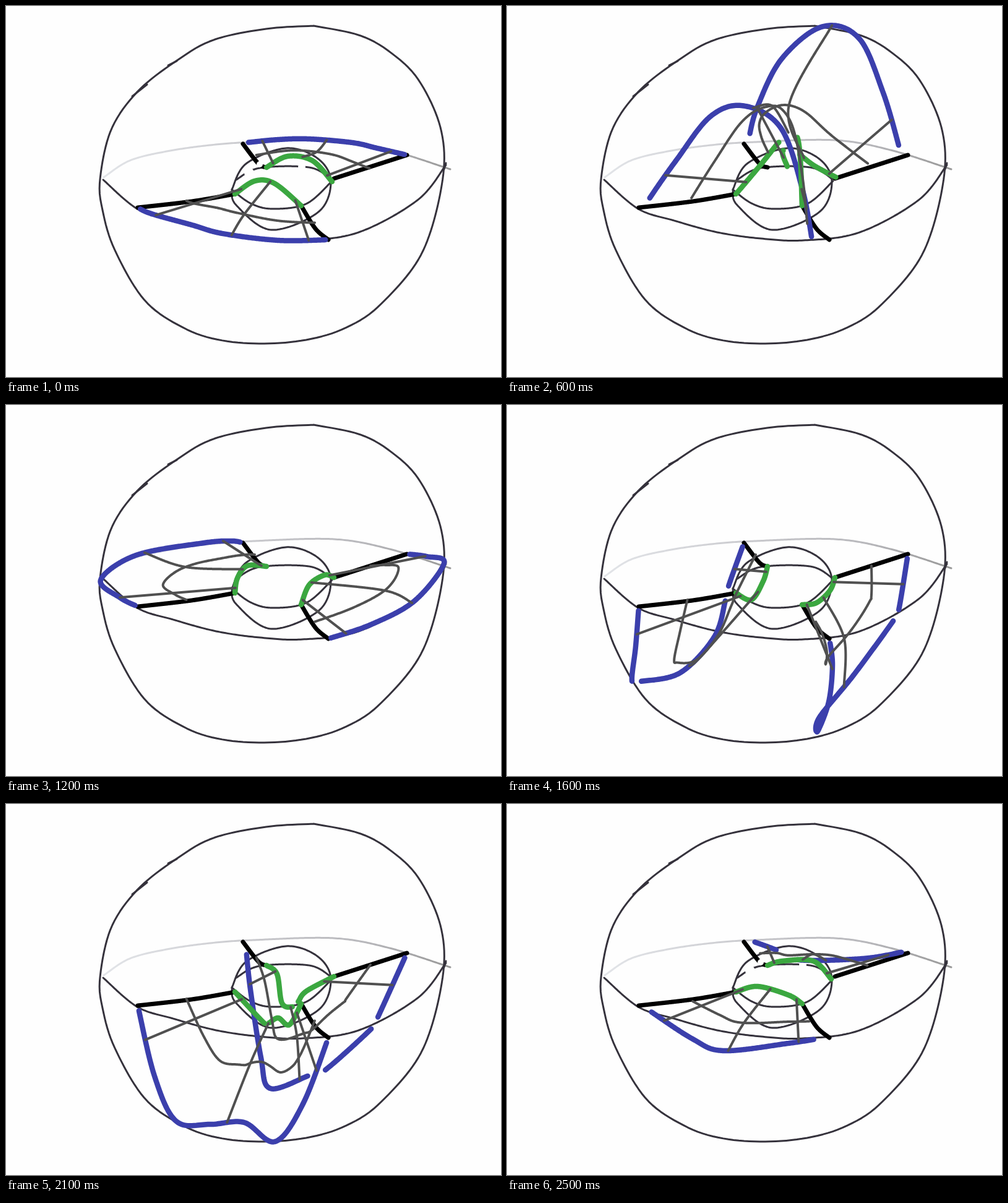
An HTML page with a canvas that plays this animation: 800 px wide and 600 px high, repeating every 2.6 s.

```html
<!DOCTYPE html>
<html lang="en">
<head>
<meta charset="utf-8">
<title>Turning sheets</title>
<style>
html, body { margin: 0; width: 100%; height: 100%; overflow: hidden; background: #fefefe; }
canvas { display: block; }
</style>
</head>
<body>
<canvas id="stage" width="800" height="600"></canvas>
<script>
const ctx = document.getElementById("stage").getContext("2d");
const LOOP = 2600, STEP = 100, N = 200, PAPER = "#fefefe";
const INK = "#35323c", BLUE = "#3b3fac", GREEN = "#3ba740", GREY = "#505050";

// Four fixed spokes join the outer ball (capital) to the inner one (small letter).
const ends = {
  A: [213, 326], a: [370, 304], B: [383, 223], b: [421, 261],
  C: [648, 241], c: [530, 279], D: [521, 378], d: [477, 323]
};
const lerp = (p, q, u) => p.map((v, j) => v + (q[j] - v) * u);

// Smooth line through "x,y" points or spoke ends; a bar lifts the pen.
function curve(text) {
  const pts = [], lifted = new Set();
  for (const token of text.split(" ")) {
    if (token === "|") lifted.add(pts.length - 1);
    else pts.push(ends[token] || token.split(",").map(Number));
  }
  return smooth(pts, lifted);
}

function smooth(pts, lifted = new Set()) {
  const at = i => pts[Math.max(0, Math.min(pts.length - 1, i))];
  const fine = [];
  for (let i = 0; i < pts.length - 1; i++) {
    const a = at(i - 1), b = at(i), c = at(i + 1), d = at(i + 2);
    for (let u = 0; u <= 1; u += 1 / 16) {
      const mix = j => b[j] + u / 2 * (c[j] - a[j] +
        u * (2 * a[j] - 5 * b[j] + 4 * c[j] - d[j] +
        u * (3 * (b[j] - c[j]) + d[j] - a[j])));
      fine.push([mix(0), mix(1), lifted.has(i) ? 0 : 1]);
    }
  }
  return spread(fine);
}

// Even samples let lines with different points blend.
function spread(fine) {
  const len = [0];
  for (let i = 1; i < fine.length; i++)
    len.push(len[i - 1] + Math.hypot(fine[i][0] - fine[i - 1][0], fine[i][1] - fine[i - 1][1]));
  const total = len[len.length - 1], out = [];
  for (let n = 0, i = 1; n < N; n++) {
    const want = total * n / (N - 1);
    while (i < len.length - 1 && len[i] < want) i++;
    out.push(lerp(fine[i - 1], fine[i], (want - len[i - 1]) / (len[i] - len[i - 1] || 1)));
  }
  return out;
}

function stroke(pts, color, width, trim = 0) {
  ctx.strokeStyle = color;
  ctx.lineWidth = width;
  ctx.lineJoin = ctx.lineCap = "round";
  ctx.beginPath();
  let down = false;
  for (const [x, y, pen = 1] of pts.slice(trim, pts.length - trim)) {
    if (pen > 0.5) down ? ctx.lineTo(x, y) : ctx.moveTo(x, y);
    down = pen > 0.5;
  }
  ctx.stroke();
}

const ball = [
  "497,32 570,47 620,74 667,120 703,200 705,285 672,400 605,483 550,520 490,539 420,546 350,541 290,522 225,477 176,395 156,330 152,280 170,200 213,138 275,89 335,55 420,37 497,32",
  "204,146 228,127", "262,96 276,89", "711,254 708,264",
  "157,281 212,328 270,347 340,366 410,376 480,379 570,366 665,314 711,257",
  "365,297 388,255 452,230 503,246 525,283 505,333 428,362 372,322 365,297",
  "365,297 395,319 430,328 485,320 527,283",
  "372,281 410,262 490,261 526,280"
].map(curve);
const farRim = curve("158,277 200,250 260,235 330,225 400,220 530,217 620,233 718,264");
const haze = ctx.createLinearGradient(158, 0, 718, 0);
["#e2e4e8", "#d4d5d9", "#c4c4c8", "#b8b8bc", "#999"].forEach((c, i) => haze.addColorStop(i / 4, c));
const spokes = ["A 300,316 a", "B 408,255 b", "C c", "D 500,360 d"].map(curve);
const rubbed = [[410, 256, 5], [393, 270, 8], [478, 260, 6]];

// Each sheet has a blue outer edge, a green inner edge and the point where its middle lines cross.
const pose = (blue, green, waist) =>
  [...blue, ...green].map(curve).concat(waist.map(p => [[...p, 1]]));

const flat = pose(
  ["A 235,336 300,354 350,368 440,379 D", "C 600,230 560,221 490,215 440,216 388,221"],
  ["a 402,283 434,287 d", "527,284 495,250 455,243 b"],
  [[385, 337], [502, 236]]);
const arched = pose(
  ["222,320 270,278 325,234 375,226 430,252 475,322 502,380",
   "639,235 605,168 562,104 510,90 450,125 408,180 390,216"],
  ["a 433,239 | 459,236 d", "c 472,241 | 445,238 443,260"],
  [[415, 216], [470, 184]]);
const tall = pose(
  ["A 232,275 260,232 295,162 360,90 378,62 380,45 382,65 376,165 B",
   "653,236 658,170 646,97 630,84 598,72 520,81 505,92 509,190 523,330 D"],
  ["a 410,240 428,262", "c 493,243 475,246 474,300 d"],
  [[413, 143], [503, 182]]);
const wide = pose(
  ["A 185,312 153,283 210,243 320,223 365,220 B", "C 680,245 708,256 660,317 590,355 D"],
  ["a 374,280 390,260 b", "c 515,275 490,291 d"],
  [[290, 262], [612, 300]]);
const hanging = pose(
  ["A 208,390 202,447 | 216,447 280,433 335,375 353,316 | 358,293 B",
   "C 633,332 | 625,348 560,437 505,505 502,528 520,480 526,420 D"],
  ["a 395,315 414,285 b", "c 522,300 500,320 d"],
  [[315, 405], [545, 378]]);
const deep = pose(
  ["A 240,440 275,513 330,518 385,515 435,546 480,485 D",
   "C 600,347 | 592,362 515,431 | 490,439 427,460 412,410 395,300 388,235"],
  ["a 418,355 | 425,354 440,346 458,357 d", "c 485,303 472,320 | 463,328 446,322 438,275 b"],
  [[395, 419], [470, 375]]);
const sagging = pose(
  ["230,334 300,380 350,399 455,387 500,380", "641,239 575,250 470,252 | 435,236 397,222"],
  ["a 405,295 455,309 d", "524,283 495,254 445,254 b"],
  [[383, 354], [495, 243]]);

const blend = (a, b, u) => a.map((line, k) => line.map((p, i) => lerp(p, b[k][i], u)));

// The sheets join up differently at 700 and at 1900.
const keys = [
  [0, flat], [400, arched], [600, blend(flat, arched, 1.45)],
  [700, tall], [800, tall], [1200, wide], [1600, hanging],
  [1800, blend(wide, hanging, 1.12)], [1900, blend(sagging, deep, 1.06)],
  [2100, deep], [2500, sagging], [LOOP, flat]
];

function poseAt(t) {
  const i = keys.findIndex(k => k[0] > t);
  const [t0, a] = keys[i - 1], [t1, b] = keys[i];
  return blend(a, b, (t - t0) / (t1 - t0));
}

// Grey lines: one halfway between the edges, three across.
function mesh(blue, green, [waist]) {
  const on = (line, u) => line[Math.round(u * (N - 1))].slice(0, 2);
  const half = u => lerp(on(blue, u), on(green, u), 0.5);
  const mid = half(0.5);
  const along = blue.map((_, i) => {
    const u = i / (N - 1), pull = Math.sin(Math.PI * u);
    return half(u).map((v, j) => v + (waist[j] - mid[j]) * pull);
  });
  const across = [0.1, 0.9].map(u => [on(blue, u), on(green, u)]);
  return [along, smooth([on(blue, 0.5), waist, on(green, 0.5)]), ...across];
}

function draw(t) {
  const [blue1, blue2, green1, green2, waist1, waist2] = poseAt(t);
  ctx.fillStyle = PAPER;
  ctx.fillRect(0, 0, 800, 600);
  stroke(farRim, haze, 3);
  ball.forEach(line => stroke(line, INK, 3));
  spokes.forEach(line => stroke(line, "#000", 7));
  if (t < 200 || t >= 2300) {
    for (const [x, y, r] of rubbed) {
      ctx.beginPath();
      ctx.arc(x, y, r, 0, 2 * Math.PI);
      ctx.fill();
    }
  }
  for (const line of [blue1, blue2]) stroke(line, BLUE, 8.5, 3);
  for (const line of [green1, green2]) stroke(line, GREEN, 8.5);
  for (const line of [...mesh(blue1, green1, waist1), ...mesh(blue2, green2, waist2)])
    stroke(line, GREY, 4);
}

const start = performance.now();
let shown = -1;
function tick() {
  const t = Math.floor(((performance.now() - start) % LOOP) / STEP) * STEP;
  if (t !== shown) draw(shown = t);
  requestAnimationFrame(tick);
}
tick();
</script>
</body>
</html>
```
